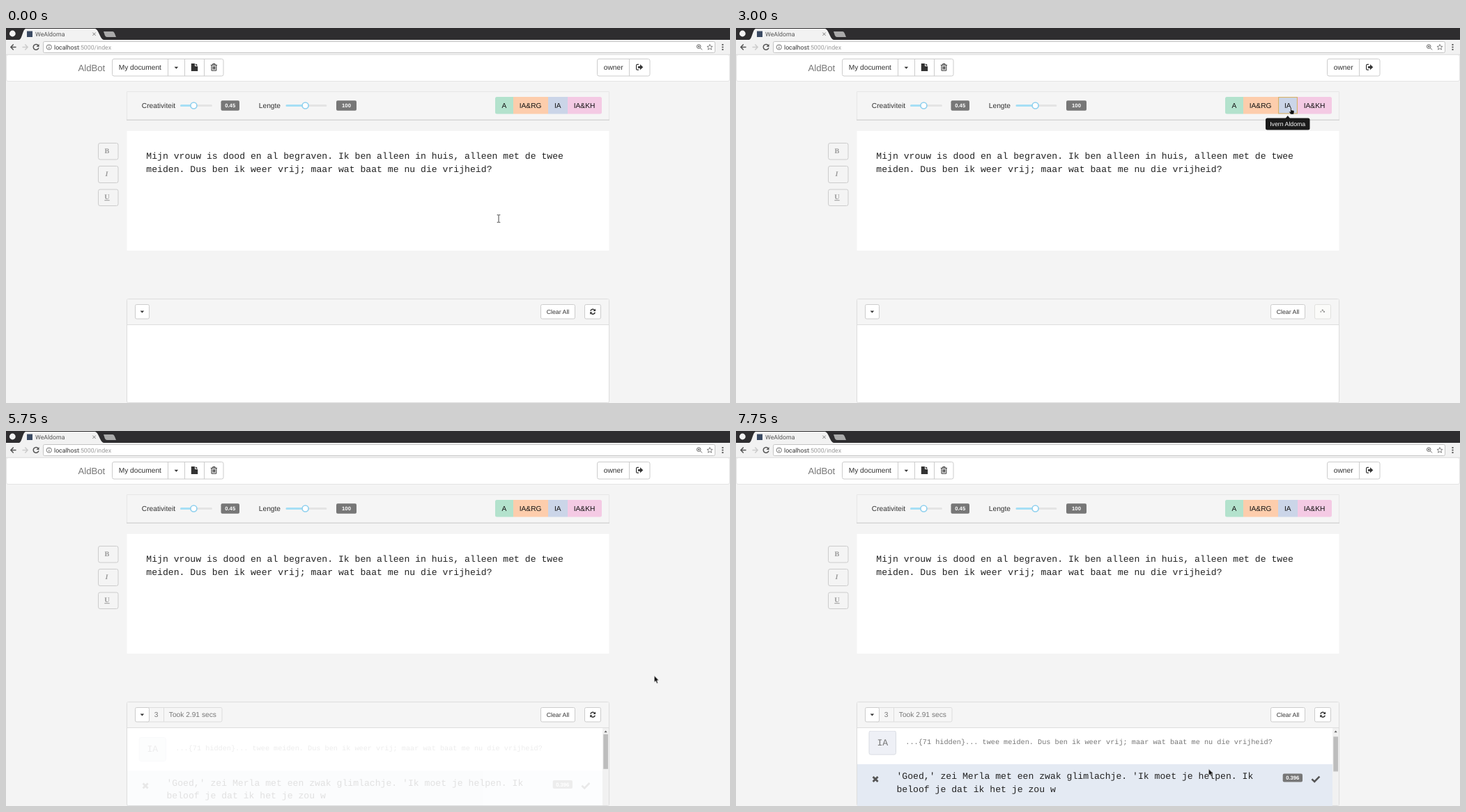
An HTML page that plays this animation: 1039 by 539 pixels, repeating every 8000 ms.

```html
<!DOCTYPE html>
<html lang="nl">
<head>
<meta charset="utf-8">
<title>WeAldoma</title>
<style>
html, body { margin: 0; width: 100%; height: 100%; overflow: hidden; background: #f4f4f4; }
svg { display: block; width: 1039px; height: 539px; }
text { font: 10.21px "Liberation Sans", Arial, sans-serif; fill: #333; text-rendering: geometricPrecision; white-space: pre; }
.mid { text-anchor: middle; }
.small { font-size: 8.75px; }
.brand { font-size: 13.13px; fill: #777; }
.ui { font: 8.75px Roboto, sans-serif; }
.mono { font: 13.13px "Liberation Mono", monospace; fill: #222; }
.hint { font-size: 10.21px; fill: #777; }
.badge { font-size: 7.66px; font-weight: bold; fill: #fff; text-anchor: middle; }
.serif { font: bold 10.2px "Liberation Serif", serif; fill: #999; text-anchor: middle; }
.muted { fill: #777; }
.btn { fill: #fff; stroke: #ccc; }
.line { fill: none; stroke: #ccc; }
.icon { fill: none; stroke: #333; stroke-width: 1.5; }
.tags text { fill: #111; text-anchor: middle; }

.cursor, .arrow, .beam, .hand, .tip, .focus, .idle, .busy, .loaded, .fade, .scroll, .thumb {
  animation: 8s step-end infinite;
}
.cursor { animation-name: move; }
.arrow { animation-name: arrow; }
.beam { animation-name: beam; }
.hand { animation-name: hand; }
.tip { animation-name: tip; }
.focus { animation-name: focus; }
.idle { animation-name: idle; }
.busy { animation-name: busy; }
.loaded { animation-name: loaded; }
.fade { animation-name: fade; }
.scroll { animation-name: scroll; }
.thumb { animation-name: thumb; }
.spin { transform-origin: 842px 407.5px; animation: spin 2s steps(8) 250ms infinite; }

@keyframes move {
  0% { transform: translate(707px, 274px); }
  3.125% { transform: translate(779px, 139px); }
  6.25% { transform: translate(781px, 137px); }
  12.5% { transform: translate(845px, 129px); }
  21.875% { transform: translate(795px, 114px); }
  40.625% { transform: translate(833px, 207px); }
  43.75% { transform: translate(905px, 264px); }
  46.875% { transform: translate(925px, 280px); }
  50% { transform: translate(929px, 283px); }
  59.375% { transform: translate(929px, 300px); }
  62.5% { transform: translate(929px, 325px); }
  65.625% { transform: translate(929px, 343px); }
  68.75% { transform: translate(930px, 349px); }
  71.875% { transform: translate(930px, 351.5px); }
  75% { transform: translate(903px, 403px); }
  78.125% { transform: translate(780px, 448px); }
  81.25% { transform: translate(687px, 467px); }
  84.375% { transform: translate(668px, 466px); }
  87.5% { transform: translate(674px, 480px); }
  90.625%, 100% { transform: translate(678px, 485.5px); }
}
@keyframes arrow {
  0%, 21.875%, 40.625% { visibility: hidden; }
  3.125%, 43.75%, 100% { visibility: visible; }
}
@keyframes beam {
  0%, 40.625% { visibility: visible; }
  3.125%, 43.75%, 100% { visibility: hidden; }
}
@keyframes hand {
  0%, 40.625%, 100% { visibility: hidden; }
  21.875% { visibility: visible; }
}
@keyframes tip {
  0%, 40.625%, 100% { visibility: hidden; }
  25% { visibility: visible; }
}
@keyframes focus {
  0%, 53.125%, 100% { visibility: hidden; }
  31.25% { visibility: visible; }
}
@keyframes idle {
  0%, 68.75%, 100% { visibility: visible; }
  31.25% { visibility: hidden; }
}
@keyframes busy {
  0%, 68.75%, 100% { visibility: hidden; }
  31.25% { visibility: visible; }
}
@keyframes loaded {
  0% { visibility: hidden; }
  68.75%, 100% { visibility: visible; }
}
@keyframes fade {
  0% { opacity: 0; }
  71.875% { opacity: .13; }
  75% { opacity: .63; }
  78.125% { opacity: .9; }
  81.25%, 100% { opacity: 1; }
}
@keyframes scroll {
  0% { transform: none; }
  96.875%, 100% { transform: translateY(-9.4px); }
}
@keyframes thumb {
  0% { transform: none; }
  96.875%, 100% { transform: translateY(3.5px); }
}
@keyframes spin { to { transform: rotate(360deg); } }
</style>
</head>
<body>
<svg viewBox="0 0 1039 539">
  <defs>
    <path id="caret" d="M-2.8 -1.4H2.8L0 1.5Z" fill="#333"/>
    <clipPath id="view"><rect x="174" y="427" width="682" height="111.5"/></clipPath>
  </defs>

  <!-- browser -->
  <rect width="1039" height="17" fill="#2e2d2f"/>
  <circle cx="9.3" cy="8" r="4.4" fill="#f2f2f2"/>
  <path d="M19 17C23 16 24 2 28 1H128C133 2 135 16 140 17Z" fill="#f2f2f2"/>
  <path d="M140 5H153Q155 5 156 8L158 13H145Q143 13 142 11Z" fill="#aaa"/>
  <rect x="30" y="4.5" width="8" height="8.5" fill="#3b4a63"/>
  <text class="ui" x="42" y="11.8" style="fill:#555">WeAldoma</text>
  <path d="M124.4 6.6l4.2 4.2m0 -4.2l-4.2 4.2" stroke="#777"/>
  <rect y="17" width="1039" height="21" fill="#f2f2f2"/>
  <path d="M0 38.3H1039" stroke="#ccc" stroke-width=".7"/>
  <path class="icon" stroke-width="1.2" d="M14.5 27.5H7M10.7 23.6L6.9 27.5L10.7 31.4" style="stroke:#555"/>
  <path class="icon" d="M23.5 27.5H31M27.3 23.6L31.1 27.5L27.3 31.4" style="stroke:#ccc"/>
  <path class="icon" d="M46.3 25.1A3.9 3.9 0 1 0 46.9 28.5" style="stroke:#555"/>
  <path d="M47.5 23V27H43.5Z" fill="#555"/>
  <rect x="53.5" y="19.5" width="964" height="16" rx="2" fill="#fff" stroke="#c4c4c4"/>
  <circle cx="61.8" cy="27.5" r="3.6" fill="none" stroke="#666" stroke-width=".9"/>
  <path d="M61.8 27V29.7M61.8 25.2V26.1" stroke="#666"/>
  <text class="ui" x="69" y="30.6">localhost<tspan fill="#999">:5000/index</tspan></text>
  <g fill="none" stroke="#666">
    <circle cx="994.2" cy="26.6" r="2.8"/>
    <path d="M996.3 28.7L999 31.4M992.8 26.6H995.6M994.2 25.2V28"/>
    <path d="M1010 23.5L1011.1 26.2L1014 26.4L1011.8 28.3L1012.5 31.1L1010 29.6L1007.5 31.1L1008.2 28.3L1006 26.4L1008.9 26.2Z" stroke-width=".8"/>
  </g>
  <path d="M1028.5 23.1v2m0 1.5v2m0 1.5v2" stroke="#555" stroke-width="2"/>

  <!-- navigation bar -->
  <rect x=".5" y="38.5" width="1038" height="38" rx="2.5" fill="#fff" stroke="#e4e4e4"/>
  <text class="brand" x="103.5" y="62">AldBot</text>
  <rect class="btn" x="152.5" y="44.5" width="159.5" height="24.5" rx="2.5"/>
  <path class="line" d="M232.5 44.5V69M256.5 44.5V69M284.5 44.5V69"/>
  <text x="161.7" y="60.4">My document</text>
  <use href="#caret" x="244.4" y="57.2"/>
  <path d="M265.8 51H271V55H275.2V62H265.8ZM272 51L275.2 54.1H272Z" fill="#333"/>
  <path class="icon" style="stroke-width:1" d="M293.8 53.3H303M296.8 53V51.5H300V53M295 53.5V61.2H301.8V53.5M297 55V59.6M298.4 55V59.6M299.8 55V59.6"/>
  <rect class="btn" x="848.5" y="44.5" width="75.5" height="24.5" rx="2.5"/>
  <path class="line" d="M894.5 44.5V69"/>
  <text x="857.8" y="60.4">owner</text>
  <path class="icon" style="stroke-width:1.2" d="M908 52.4H906Q904.6 52.4 904.6 53.8V58.8Q904.6 60.2 906 60.2H908"/>
  <path d="M907 54.9H910V52.3L914.3 56.3L910 60.3V57.7H907Z" fill="#333"/>

  <!-- settings -->
  <path d="M173.5 132V91.5H865.5V132" fill="#f5f5f5" stroke="#e6e6e6"/>
  <path d="M173 132.3H866" stroke="#d6d6d6" stroke-width="1.6"/>
  <text x="194.8" y="115">Creativiteit</text>
  <text x="362.8" y="115">Lengte</text>
  <g stroke-width="3" stroke-linecap="round">
    <path d="M251.5 111.5H294.5M403 111.5H459" stroke="#e4e4e4"/>
    <path d="M251.5 111.5H269M403 111.5H429" stroke="#a6dff5"/>
  </g>
  <g fill="#fff" stroke="#8fd0ee" stroke-width="1.6">
    <circle cx="269.4" cy="111.5" r="4.5"/>
    <circle cx="429.6" cy="111.5" r="4.5"/>
  </g>
  <g fill="#777">
    <rect x="308.5" y="104.3" width="26.5" height="14.4" rx="2"/>
    <rect x="474" y="104.3" width="29" height="14.4" rx="2"/>
  </g>
  <text class="badge" x="321.7" y="114.2">0.45</text>
  <text class="badge" x="488.5" y="114.2">100</text>
  <g class="tags">
    <path d="M728 99H704.5Q702 99 702 101.5V121Q702 123.5 704.5 123.5H728Z" fill="#b3e2cd"/>
    <path d="M728 99H778V123.5H728Z" fill="#fdcdac"/>
    <path d="M778 99H806V123.5H778Z" fill="#cbd5e8"/>
    <path d="M806 99H852.5Q855 99 855 101.5V121Q855 123.5 852.5 123.5H806Z" fill="#f4cae4"/>
    <rect class="focus" x="778.6" y="99.6" width="26.8" height="23.3" fill="none" stroke="#e59700" stroke-opacity=".6"/>
    <text x="715" y="115">A</text>
    <text x="752.6" y="115">IA&amp;RG</text>
    <text x="791.7" y="115">IA</text>
    <text x="830" y="115">IA&amp;KH</text>
  </g>

  <!-- editor -->
  <rect x="173.5" y="148" width="692" height="172" fill="#fff"/>
  <text class="mono" x="201.3" y="188">Mijn vrouw is dood en al begraven. Ik ben alleen in huis, alleen met de twee</text>
  <text class="mono" x="201.3" y="206.8">meiden. Dus ben ik weer vrij; maar wat baat me nu die vrijheid?</text>
  <g class="line">
    <rect x="132.5" y="165.5" width="28.5" height="23.5" rx="2.5"/>
    <rect x="132.5" y="198.5" width="28.5" height="24" rx="2.5"/>
    <rect x="132.5" y="232" width="28.5" height="23.5" rx="2.5"/>
  </g>
  <text class="serif" x="145" y="179.6">B</text>
  <text class="serif" x="144.6" y="213" style="font-style:italic">I</text>
  <text class="serif" x="145" y="246.2" style="text-decoration:underline">U</text>

  <!-- results -->
  <rect x="173.5" y="389.5" width="692" height="149" rx="2" fill="#fff" stroke="#ddd"/>
  <path d="M174 390H865V426.5H174Z" fill="#f5f5f5"/>
  <path d="M174 426.5H865" stroke="#ddd"/>
  <g class="loaded">
    <rect x="200.5" y="397.5" width="109.5" height="20.5" rx="2" fill="#f6f6f6" stroke="#ddd"/>
    <path d="M226.5 397.5V418" stroke="#ddd"/>
    <text class="muted" x="212.8" y="411.4">3</text>
    <text class="muted" x="233.8" y="411.4">Took 2.91 secs</text>
  </g>
  <rect class="btn" x="185.5" y="397.5" width="20" height="20.5" rx="2"/>
  <use href="#caret" x="195.4" y="408"/>
  <rect class="btn" x="767.5" y="397.5" width="49" height="20.5" rx="2"/>
  <text class="small mid" x="792" y="410.9">Clear All</text>
  <g class="idle">
    <rect class="btn" x="830.5" y="397.5" width="23" height="20.5" rx="2"/>
    <path class="icon" d="M838.9 406.7A3.3 3.3 0 0 1 844.8 405.6M845.3 408.7A3.3 3.3 0 0 1 839.4 409.8"/>
    <path d="M846.1 403.6V407.1H842.6ZM838.1 411.8V408.3H841.6Z" fill="#333"/>
  </g>
  <g class="busy">
    <rect x="830.5" y="397.5" width="23" height="20.5" rx="2" fill="#fbfbf9" stroke="#e0e0de"/>
    <g class="spin" fill="#555">
      <circle cx="840.8" cy="406" r=".9"/>
      <circle cx="840.8" cy="409" r=".9"/>
      <circle cx="844" cy="409.2" r=".8"/>
    </g>
  </g>

  <g clip-path="url(#view)">
    <g class="fade"><g class="scroll">
      <rect x="191" y="440.5" width="38.5" height="34" rx="2.5" fill="#eef0f6" stroke="#d9dce2"/>
      <text class="mono mid muted" x="210.3" y="461" style="fill:#777">IA</text>
      <text class="mono hint" x="243.3" y="459.4">...{71 hidden}... twee meiden. Dus ben ik weer vrij; maar wat baat me nu die vrijheid?</text>
      <rect x="174" y="488.3" width="682" height="75" fill="#e4eaf3"/>
      <path d="M196.6 506.4l7 7m0 -7l-7 7" stroke="#555" stroke-width="2.8"/>
      <text class="mono" x="230.4" y="509.5">'Goed,' zei Merla met een zwak glimlachje. 'Ik moet je helpen. Ik</text>
      <text class="mono" x="230.4" y="528.2">beloof je dat ik het je zou w</text>
      <rect x="784.7" y="502" width="28.3" height="12" rx="2" fill="#777"/>
      <text class="badge" x="798.8" y="510.8">0.396</text>
      <path d="M826.4 509.8L830.2 513.4L837.4 506" fill="none" stroke="#555" stroke-width="2.6"/>
    </g></g>
  </g>
  <g class="loaded">
    <rect x="856" y="427" width="9" height="111" fill="#f1f1f1"/>
    <path d="M858.4 433.2H862.8L860.6 430.6Z" fill="#666"/>
    <rect class="thumb" x="857.3" y="435.8" width="6.7" height="50" fill="#bdbdbd"/>
  </g>

  <g class="tip">
    <path d="M788.5 130L791.8 126L795.1 130Z" fill="#1a1a1a"/>
    <rect x="760" y="129.4" width="63.5" height="17" rx="2.5" fill="#1a1a1a"/>
    <text class="small mid" x="791.7" y="141.4" style="fill:#fff">Ivern Aldoma</text>
  </g>

  <g class="cursor">
    <path class="arrow" d="M.3 .3V9.6L2.4 7.7L4 11.2L5.6 10.4L4 7.1H6.9Z" fill="#111" stroke="#fff" stroke-width=".5"/>
    <path class="beam" d="M-2.3 -5.3H-.6L0 -4.8L.6 -5.3H2.3M0 -4.8V4.8M-2.3 5.3H-.6L0 4.8L.6 5.3H2.3" fill="none" stroke="#444"/>
    <path class="hand" d="M.7 .8Q1.4 -.2 2.1 .8V4L5 4.6Q6.2 4.9 6 6.4L5.4 10H1L-1.4 6.5Q-1.4 5.4 .7 6.6Z" fill="#111" stroke="#fff" stroke-width=".4"/>
  </g>
</svg>
</body>
</html>
```
